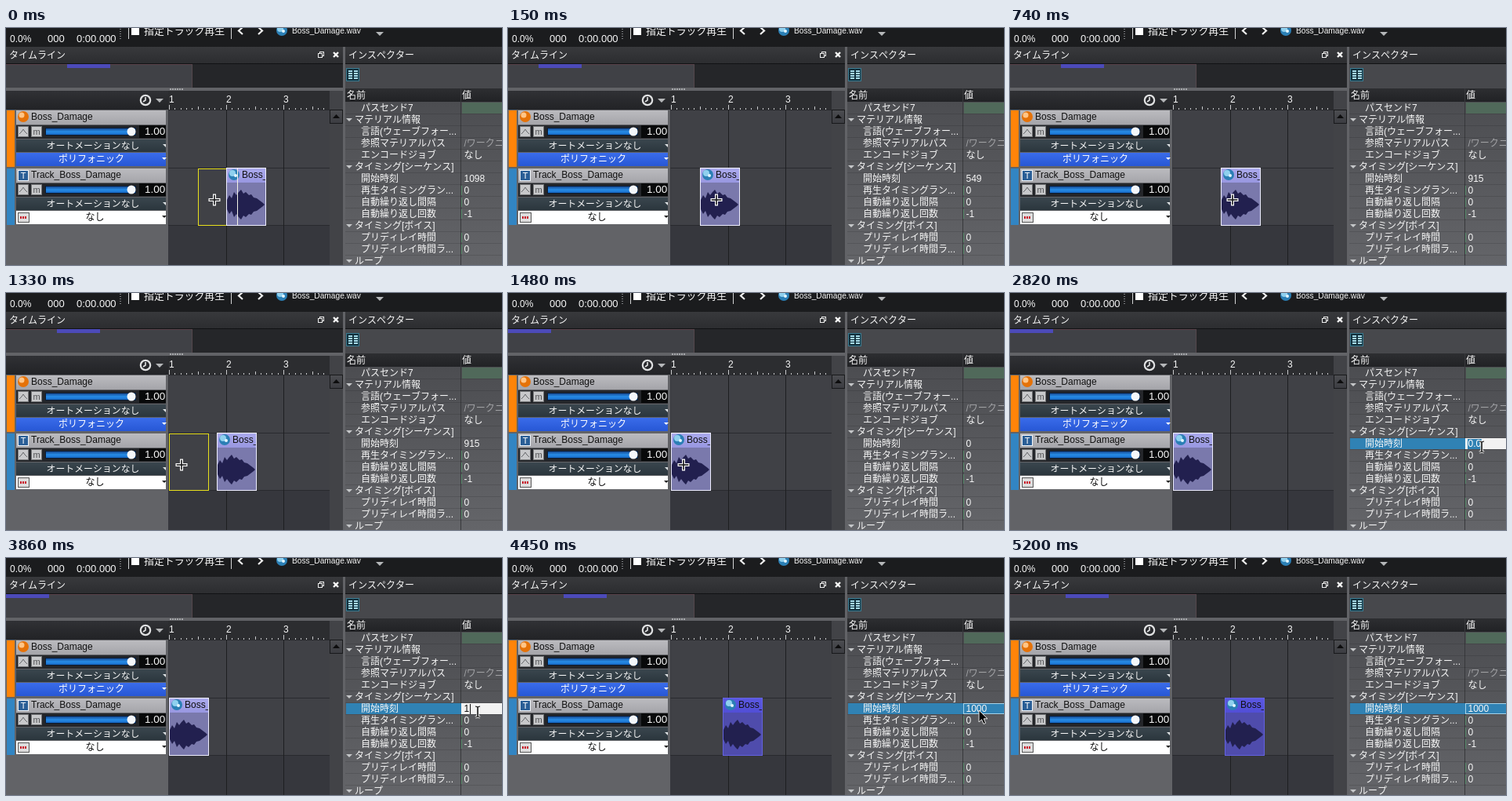
An HTML page with a canvas that plays this animation: 633x302 px, repeating every 5.65 s.

```html
<!DOCTYPE html>
<html lang="ja">
<head>
<meta charset="utf-8">
<title>Timeline editor</title>
<style>
html, body { margin: 0; width: 100%; height: 100%; overflow: hidden; background: #1d1e20; }
canvas { display: block; }
</style>
</head>
<body>
<canvas id="stage" width="633" height="302"></canvas>
<script>
const ctx = document.getElementById('stage').getContext('2d');
const FONT = "'Liberation Sans', 'Noto Sans CJK JP', 'Noto Sans CJK', sans-serif";
const PANEL = '#626367', ACCENT = '#3082b4';
const LOOP = 5650, STEP = 183;
const ORIGIN = 208, BEAT = 73, CLIP_W = 51;
const timeToX = ms => Math.round(ORIGIN + ms * BEAT / 1098);

// [from ms, clip start, drag ghost start or null, cursor kind, cursor x, cursor y, edit text]
const STATES = [
  [0,    1098, 3 * STEP, 'cross', 266, 219],
  [150,  549,  null,     'cross', 266, 219],
  [590,  549,  4 * STEP, 'cross', 275, 219],
  [740,  915,  null,     'cross', 284, 219],
  [1190, 915,  2 * STEP, 'cross', 248, 219],
  [1330, 915,  0,        'cross', 224, 219],
  [1480, 0,    null,     'cross', 224, 219],
  [1930, 0,    null,     'arrow', 450, 196],
  [2080, 0,    null,     'arrow', 541, 183],
  [2230, 0,    null,     'arrow', 544, 181],
  [2370, 0,    null,     'arrow', 575, 186],
  [2520, 0,    null,     'arrow', 589, 191],
  [2670, 0,    null,     'arrow', 601, 195],
  [2820, 0,    null,     'beam',  602, 196, '0.0'],
  [3860, 0,    null,     'beam',  602, 196, '1'],
  [4010, 0,    null,     'beam',  602, 196, '100'],
  [4160, 0,    null,     'beam',  602, 196, '1000'],
  [4450, 1000, null,     'arrow', 601, 194],
  [5050, 1000, null,     'arrow', 602, 200],
  [5200, 1000, null,     'none',  0, 0]
];

// Half heights of the waveform along the clip
const WAVE = [[1, 6], [4, 12], [7, 8], [10, 16], [13, 12], [16, 16], [19, 19], [22, 14], [25, 16],
  [29, 12], [32, 13], [35, 9], [39, 8], [43, 5], [47, 2], [49, 0]];

function box(x, y, w, h, color) {
  ctx.fillStyle = color;
  ctx.fillRect(x, y, w, h);
}

function frame(x, y, w, h, color) {
  ctx.strokeStyle = color;
  ctx.lineWidth = 1;
  ctx.strokeRect(x + .5, y + .5, w - 1, h - 1);
}

function fade(x, y, w, h, ...colors) {
  const g = ctx.createLinearGradient(0, y, 0, y + h);
  colors.forEach((c, i) => g.addColorStop(i / (colors.length - 1), c));
  box(x, y, w, h, g);
}

function text(s, x, y, color = '#f6f6f6', size = 12, align = 'left') {
  ctx.font = `500 ${size}px ${FONT}`;
  ctx.textAlign = align;
  ctx.fillStyle = color;
  ctx.fillText(s, x, y);
}

function shape(points, fill) {
  ctx.beginPath();
  points.forEach(([x, y]) => ctx.lineTo(x, y));
  ctx.closePath();
  ctx.fillStyle = fill;
  ctx.fill();
}

function line(points, color, width = 1) {
  ctx.beginPath();
  points.forEach(([x, y]) => ctx.lineTo(x, y));
  ctx.strokeStyle = color;
  ctx.lineWidth = width;
  ctx.stroke();
}

function disc(x, y, r, color) {
  ctx.beginPath();
  ctx.arc(x, y, r, 0, 7);
  ctx.fillStyle = color;
  ctx.fill();
}

function downArrow(x, y, half, color) {
  shape([[x - half, y], [x + half, y], [x, y + half]], color);
}

function clipped(x, y, w, h, draw) {
  ctx.save();
  ctx.beginPath();
  ctx.rect(x, y, w, h);
  ctx.clip();
  draw();
  ctx.restore();
}

function waveIcon(x, y) {
  disc(x, y, 7, '#2b7fb5');
  disc(x - 2, y - 2, 4, '#8fd0ee');
  disc(x + 2, y + 1, 2, '#e4f6ff');
}

function drawToolbar() {
  box(0, 0, 633, 24, '#1b1c1e');
  text('0.0%', 5, 18);
  text('000', 53, 18, '#f6f6f6', 13);
  text('0:00.000', 90, 18, '#f6f6f6', 13);
  for (let y = 1; y < 14; y += 3) box(145, y, 2, 1, '#77797c');
  for (const x of [156, 287]) box(x, 0, 1, 14, '#d4d5d6');
  box(160, 0, 10, 9, '#fff');
  text('指定トラック再生', 176, 8, '#f6f6f6', 12.9);
  line([[302, -1], [297, 3.5], [302, 8]], '#f0f0f0', 2.2);
  line([[322, -1], [327, 3.5], [322, 8]], '#f0f0f0', 2.2);
  waveIcon(352, 3);
  text('Boss_Damage.wav', 365, 7, '#f6f6f6', 10.2);
  downArrow(477, 5, 5, '#b5b7b9');
}

function drawTitles() {
  fade(0, 24, 430, 21, '#38393c', '#2c2d30');
  fade(433, 24, 200, 21, '#38393c', '#2c2d30');
  text('タイムライン', 4, 39);
  text('インスペクター', 437, 39);
  frame(400, 30, 6, 6, '#eee');
  box(398, 32, 6, 6, '#303134');
  frame(398, 32, 6, 6, '#eee');
  line([[418, 31], [424, 37]], '#f6f6f6', 2.4);
  line([[424, 31], [418, 37]], '#f6f6f6', 2.4);
  box(0, 45, 633, 1, '#111214');
}

function drawOverview(start) {
  box(0, 46, 430, 30, '#252629');
  box(0, 46, 238, 30, '#404146');
  box(0, 46, 238, 1, '#59424a');
  box(237, 46, 1, 30, '#55474d');
  box(Math.round(start * .071), 46, 55, 5, '#4c4ab8');
  box(0, 76, 430, 4, PANEL);
  for (let x = 209; x < 227; x += 3) box(x, 77, 2, 2, '#a5a7aa');
}

function drawRuler() {
  fade(0, 80, 207, 24, '#303135', '#222326');
  ctx.beginPath();
  ctx.arc(178, 92, 6.2, 0, 7);
  ctx.strokeStyle = '#e0e1e2';
  ctx.lineWidth = 2.2;
  ctx.stroke();
  line([[178, 88], [178, 92], [175, 94]], '#e0e1e2', 1.6);
  downArrow(196, 90, 5, '#b5b7b9');
  box(207, 80, 206, 24, '#2c2d30');
  for (let i = 0; i < 28; i++) {
    const h = i % 10 ? (i % 5 ? 2 : 4) : 6;
    box(Math.round(ORIGIN + i * BEAT / 10), 104 - h, 1, h, '#c9cacc');
  }
  for (let i = 0; i < 3; i++) text(i + 1, ORIGIN + i * BEAT, 95);
}

function drawGrid() {
  box(207, 104, 206, 198, '#36373d');
  box(208, 105, 205, 73, '#404146');
  box(208, 179, 205, 72, '#404146');
  for (const y of [104, 178, 251]) box(207, y, 206, 1, '#292a2e');
  for (const x of [281, 354]) box(x, 105, 1, 197, '#1d1e21');
  box(413, 80, 17, 222, '#424347');
  fade(414, 105, 15, 16, '#4c4d51', '#3c3d42');
  frame(413, 104, 17, 18, '#18191b');
  shape([[417, 115], [426, 115], [421.5, 110]], '#0d0d0e');
  box(430, 24, 3, 278, PANEL);
}

function drawTrack(y, color, name) {
  box(1, y, 10, 72, color);
  fade(13, y, 191, 18, '#bbbbbf', '#a5a5aa');
  text(name, 32, y + 12, '#111');

  box(13, y + 19, 191, 17, '#24262a');
  for (const x of [15, 32]) {
    box(x, y + 20, 14, 14, '#c8c9cb');
    frame(x, y + 20, 14, 14, '#78797b');
  }
  line([[17, y + 30], [20, y + 27], [22, y + 24], [24, y + 27], [27, y + 30]], '#66686b');
  text('m', 39, y + 31, '#4c4d50', 11, 'center');
  fade(50, y + 22, 116, 10, '#123b80', '#278de8', '#1461bd');
  frame(50, y + 22, 116, 10, '#0a1c36');
  disc(160, y + 27, 5.5, '#f4f7fb');
  box(170, y + 19, 34, 16, '#08090a');
  clipped(170, y + 18, 34, 18, () => text('1.00', 177, y + 31, '#f6f6f6', 13.5));

  fade(13, y + 37, 191, 16, '#3a464e', '#2b363d');
  text('オートメーションなし', 111, y + 49, '#f6f6f6', 11.9, 'center');
  clipped(196, y + 36, 8, 18, () => downArrow(204, y + 43, 4, '#dfe3e5'));
}

function drawTracks() {
  box(0, 104, 207, 198, PANEL);
  drawTrack(105, '#ff8409', 'Boss_Damage');
  disc(22, 113, 7, '#e57208');
  disc(20, 111, 3.5, '#ffc586');
  fade(13, 159, 191, 17, '#3a6cea', '#2757d5');
  text('ポリフォニック', 109, 171, '#fff', 12, 'center');
  downArrow(202, 165, 3, '#fff');

  drawTrack(179, '#3285c3', 'Track_Boss_Damage');
  box(15, 181, 14, 14, '#2a5e96');
  frame(15, 181, 14, 14, '#f0f5fa');
  text('T', 22, 192, '#fff', 11, 'center');
  box(13, 233, 191, 17, '#fff');
  box(15, 235, 15, 13, '#ddd');
  frame(15, 235, 15, 13, '#555');
  for (const x of [18, 21, 24]) box(x, 240, 2, 3, '#c9202c');
  text('なし', 113.5, 245, '#111', 12, 'center');
  downArrow(202, 239, 3, '#222');
}

function drawClip(start, ghost, committed) {
  const x = timeToX(start);
  const ghostX = ghost === null ? null : timeToX(ghost);
  if (ghostX !== null) frame(ghostX, 179, CLIP_W, 73, '#e8e01c');
  box(x, 178, CLIP_W, 74, committed ? '#4f4cac' : '#7a79ac');
  fade(x, 178, CLIP_W, 19, ...(committed ? ['#5b58e2', '#514ed6'] : ['#acabee', '#9897e0']));
  clipped(x, 178, CLIP_W - 1, 74, () => {
    waveIcon(x + 10, 187);
    text('Boss_Damage', x + 20, 191, '#111');
  });
  const top = WAVE.map(([dx, h]) => [x + dx, 225 - h]);
  const bottom = WAVE.map(([dx, h]) => [x + dx, 225 + h]).reverse();
  shape([...top, ...bottom], '#22204f');
  frame(x, 178, CLIP_W, 74, committed ? '#6462e0' : '#eeeeff');
  if (ghostX !== null) {
    for (const edge of [ghostX, ghostX + CLIP_W - 1]) {
      if (edge > x && edge < x + CLIP_W) box(edge, 179, 1, 72, '#f3f2e6');
    }
  }
}

function drawInspector(start, edit, selected) {
  const rows = [
    ['パスセンド7', ''], ['#マテリアル情報'], ['言語(ウェーブフォー...', ''],
    ['参照マテリアルパス', '/ワークニ'], ['エンコードジョブ', 'なし'],
    ['#タイミング[シーケンス]'], ['開始時刻', start], ['再生タイミングラン...', 0],
    ['自動繰り返し間隔', 0], ['自動繰り返し回数', -1],
    ['#タイミング[ボイス]'], ['プリディレイ時間', 0], ['プリディレイ時間ラ...', 0], ['#ループ']
  ];
  box(433, 46, 200, 31, '#47484c');
  box(434, 51, 17, 17, '#12303c');
  frame(434, 51, 17, 17, '#3a7b91');
  for (const x of [437, 444]) for (let y = 54; y < 66; y += 3) box(x, y, 5, 2, '#a8dcea');
  fade(433, 77, 200, 17, '#2d2e31', '#212225');
  text('名前', 435, 90);
  text('値', 582, 90);
  fade(433, 94, 200, 208, '#4c4d51', '#646569');
  box(580, 77, 1, 225, '#37383b');

  rows.forEach(([label, value], i) => {
    const y = 95 + i * 15, isStart = i === 6;
    box(433, y + 14, 200, 1, 'rgba(0, 0, 0, .12)');
    if (label[0] === '#') {
      downArrow(438, y + 5, 4, '#c5c7c9');
      text(label.slice(1), 445, y + 11);
      return;
    }
    if (isStart && selected) box(434, y, 199, 14, ACCENT);
    if (i === 0) box(582, y, 51, 14, '#50695a');
    if (typeof value === 'number' && !isStart) box(581, y + 1, 1, 12, '#5d9070');
    text(label, 453, y + 11);
    if (isStart && edit) {
      drawEditor(edit, y);
      return;
    }
    text(value, 584.5, y + 11, i === 3 ? '#a0a1a4' : '#f6f6f6');
    if (isStart && selected) frame(581, y, 53, 14, '#a9d4ea');
  });
}

function drawEditor(value, y) {
  const untouched = value === '0.0';
  box(581, y, 52, 14, '#f2f2f2');
  ctx.font = `500 12px ${FONT}`;
  const width = ctx.measureText(value).width;
  if (untouched) box(584, y + 1, width + 1, 13, ACCENT);
  else box(Math.round(585 + width), y + 1, 1, 13, '#111');
  text(value, 584.5, y + 11, untouched ? '#fff' : '#111');
}

function drawCursor(kind, x, y) {
  if (kind === 'cross') {
    for (const [color, width, r] of [['#fff', 4, 7.5], ['#17171a', 1.6, 6.3]]) {
      line([[x - r, y], [x + r, y]], color, width);
      line([[x, y - r], [x, y + r]], color, width);
    }
  } else if (kind === 'arrow') {
    const outline = [[0, 0], [0, 15], [3.5, 11.8], [6, 17.5], [8.6, 16.3], [6.2, 10.8], [11, 10.8]]
      .map(([dx, dy]) => [x + dx, y + dy]);
    shape(outline, '#050505');
    line([...outline, outline[0]], '#e9e9e9', 1);
  } else if (kind === 'beam') {
    const beam = [[x - 3, y - 7], [x, y - 6], [x, y + 6], [x - 3, y + 7]];
    const mirror = beam.map(([px, py]) => [2 * x - px, py]);
    for (const [color, width] of [['#eee', 3], ['#222', 1.2]]) {
      line(beam, color, width);
      line(mirror, color, width);
    }
  }
}

function render(t) {
  const [from, start, ghost, kind, x, y, edit] = STATES.findLast(s => s[0] <= t);
  drawToolbar();
  drawTitles();
  drawOverview(start);
  drawRuler();
  drawGrid();
  drawTracks();
  drawClip(start, ghost, from >= 4450);
  drawInspector(start, edit, from >= 2820);
  drawCursor(kind, x, y);
}

const begin = performance.now();
function tick() {
  render((performance.now() - begin) % LOOP);
  requestAnimationFrame(tick);
}
tick();
</script>
</body>
</html>
```
